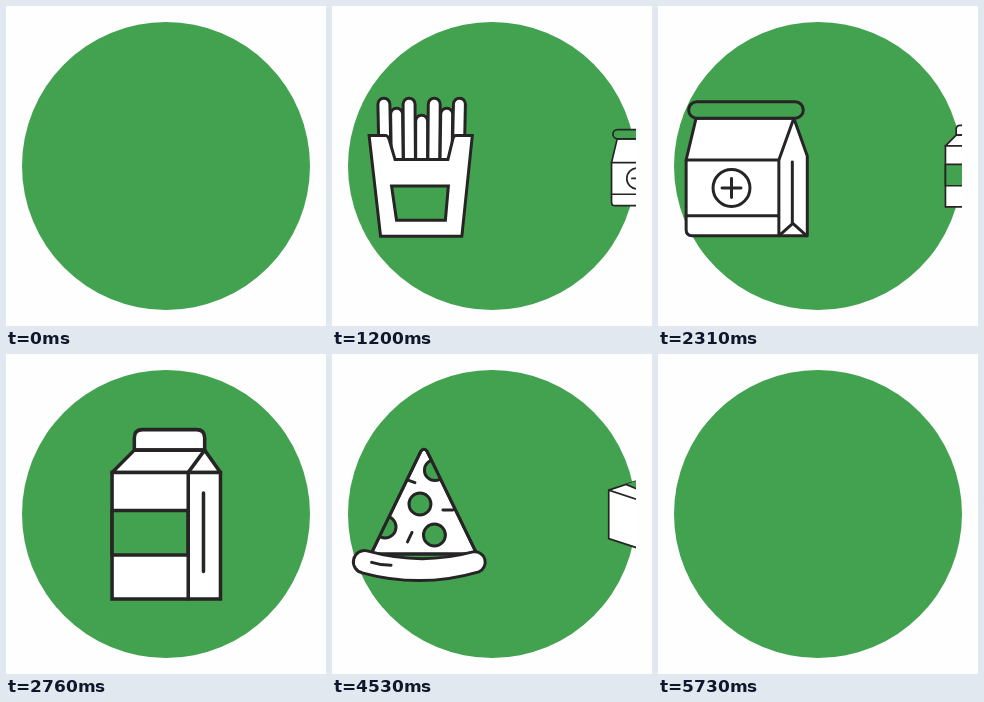
An HTML page that plays this animation: 320 by 320 pixels, repeating every 5.76 s.

```html
<!DOCTYPE html>
<html lang="en">
<head>
<meta charset="utf-8">
<title>Delivery icons</title>
<style>
  html, body { margin: 0; width: 100%; height: 100%; overflow: hidden; background: #fefefe; }
  svg { display: block; width: 100vw; height: 100vh; }
  .icon { fill: #fff; stroke: #272425; stroke-width: 3; stroke-linejoin: round; stroke-linecap: round; }
  .sharp { stroke-linejoin: miter; stroke-linecap: butt; }
  .green { fill: #42a250; }
  .line { fill: none; }
</style>
</head>
<body>
<svg viewBox="0 0 320 320">
  <defs>
    <clipPath id="stage"><rect x="16" y="16" width="288" height="288"/></clipPath>
    <clipPath id="slice"><path d="M90 97Q93 93 96 97L146 200H40Z"/></clipPath>
  </defs>
  <circle class="green" cx="160" cy="160" r="144"/>
  <g clip-path="url(#stage)">
    <!-- fries -->
    <g class="icon sharp"><g transform="scale(1.172) translate(-89.3 -160)">
      <g id="sticks"></g>
      <path d="M38 129.5H55Q57 130 58 133L64 153.5H117L122 133Q123 129.5 125 129.5H141.500L131 230.500H49.500Z"/>
      <path class="green" d="M60.500 180H117.500L114.500 214.500H65.500Z"/>
    </g></g>
    <!-- paper bag -->
    <g class="icon"><g transform="scale(1.172) translate(-89.3 -160)">
      <path d="M39 112L29 154V224Q29 230 35 230H150.500V150L137 112Z"/>
      <path class="line" d="M29 154H122M137 112L122 154V230L136 217.500L150 230M29 210H122M135.500 156V217"/>
      <rect class="green" x="31.500" y="95.500" width="115" height="16.500" rx="8.250"/>
      <circle cx="74.500" cy="182" r="18.500"/>
      <path class="line" d="M65 182H84M74.500 172.500V191.500"/>
    </g></g>
    <!-- milk carton -->
    <g class="icon"><g transform="scale(1.172) translate(-89.3 -160)">
      <path d="M62 105.500V95Q62 88 69 88H115Q122 88 122 95V105.500Z"/>
      <path d="M62 105.500H122L135.500 124.500H43Z"/>
      <path class="sharp" d="M43 124.500H135.500V232.500H43Z"/>
      <path class="green" d="M43 157H108V195H43Z"/>
      <path class="line" d="M122 105.500L108 124.500V232.500M121 142V209"/>
    </g></g>
    <!-- pizza -->
    <g class="icon"><g transform="scale(1.172) translate(-89.3 -160)">
      <path d="M90 97Q93 93 96 97L146 200H40Z"/>
      <g class="green" clip-path="url(#slice)">
        <circle cx="104" cy="116" r="10.500"/>
        <circle cx="89" cy="150" r="11"/>
        <circle cx="54" cy="173" r="11"/>
        <circle cx="103.500" cy="181" r="11"/>
      </g>
      <path class="line" d="M90 97Q93 93 96 97L146 200H40ZM77 126L84 128.500M112 156H122M76.500 188L81 178.500"/>
      <path d="M36 197Q90 212 142 198A10.500 10.500 0 0 1 148 218Q90 235 31 219A11.200 11.200 0 0 1 36 197Z"/>
      <path class="line" d="M40.500 208.500Q50 211.500 60 211.500"/>
    </g></g>
    <!-- parcel -->
    <g class="icon sharp"><g transform="translate(-160.500 -160)" stroke-width="3.500">
      <path d="M84 110.500L160.500 85L237 110.500V211L160.500 236L84 211Z"/>
      <path class="line" d="M84 110.500L160.500 136L237 110.500M160.500 136V236"/>
      <path class="green" stroke="none" d="M120 98.500L187 127V151L212 143V119L141 91.500Z"/>
      <path class="line" d="M120 98.500L187 127V151L212 143V119L141 91.500"/>
    </g></g>
  </g>
</svg>
<script>
  const LOOP = 5760, STEP = 1110;
  const ENTER = 600, LEAVE_AT = 930, LEAVE = 390;
  const icons = [...document.querySelectorAll('.icon')];

  const stickTops = [92, 102, 92, 109, 92, 102, 92];
  document.getElementById('sticks').innerHTML = stickTops.map((top, i) =>
    `<rect x="${47.5 + i * 12.4}" y="${top}" width="12" height="${160 - top}" rx="6"
      transform="rotate(${(i - 3) * 0.4} ${53.5 + i * 12.4} 130)"/>`).join('');

  const clamp = v => Math.min(1, Math.max(0, v));

  function pose(t) {
    const before = (1 - clamp(t / ENTER)) ** 4;
    const after = clamp((t - LEAVE_AT) / LEAVE) ** 4;
    return { x: 160.3 + 296 * before - 309 * after, scale: 1 - before - 0.64 * after };
  }

  function draw(time) {
    icons.forEach((icon, i) => {
      const t = time - i * STEP;
      const visible = t > 0 && t < LEAVE_AT + LEAVE;
      icon.style.display = visible ? '' : 'none';
      if (!visible) return;
      const { x, scale } = pose(t);
      icon.setAttribute('transform', `translate(${x} 160) scale(${scale})`);
    });
  }

  const start = performance.now();
  function frame() {
    draw((performance.now() - start) % LOOP);
    requestAnimationFrame(frame);
  }
  frame();
</script>
</body>
</html>
```
